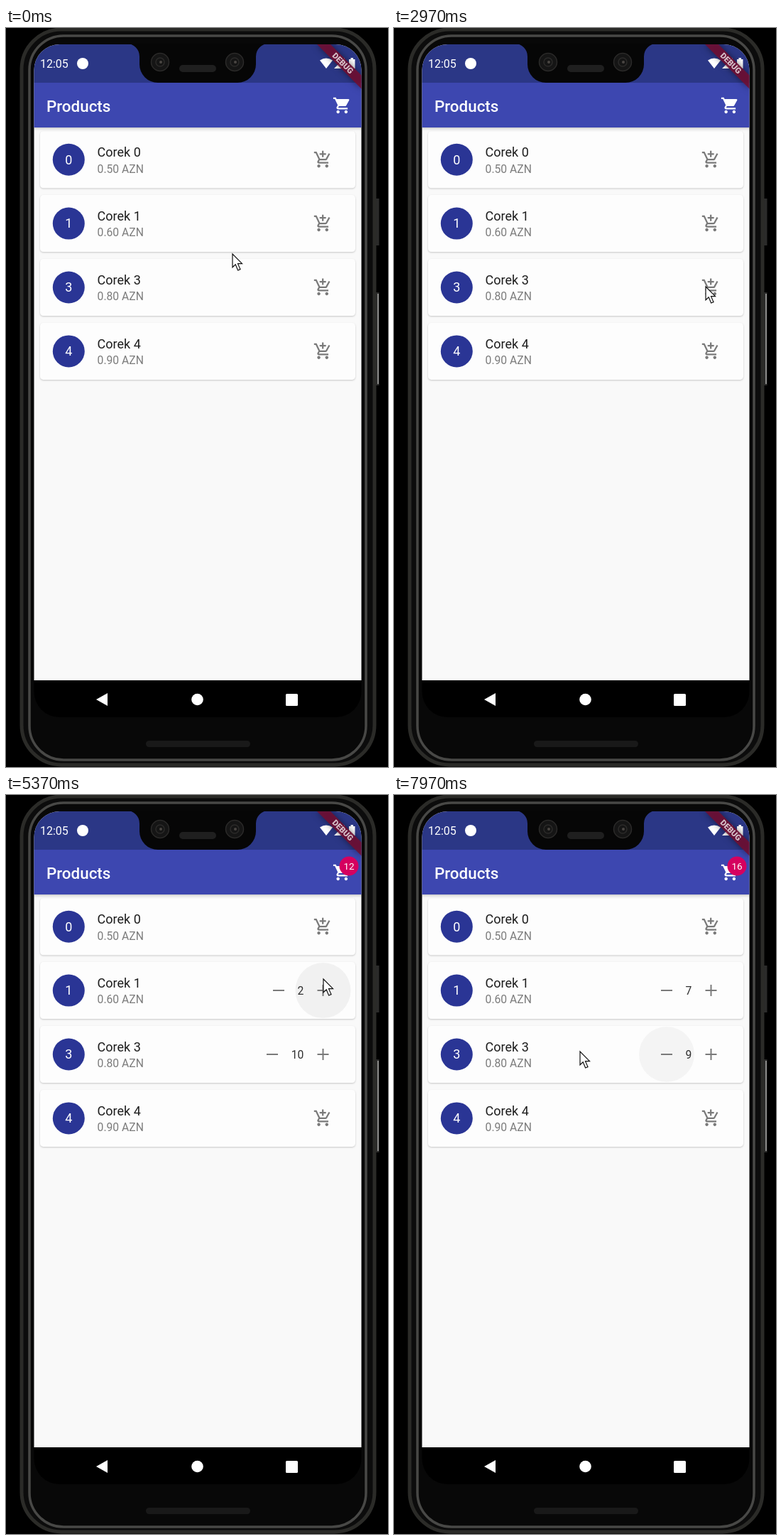
Animation of 538 by 1040 pixels, one loop 8 s. Source, as an HTML page:

```html
<!DOCTYPE html>
<html lang="en">
<head>
<meta charset="utf-8">
<title>Products</title>
<style>
  html, body { margin: 0; width: 100%; height: 100%; overflow: hidden; background: #000; }
  svg { display: block; width: 538px; height: 1040px; font-family: Roboto, Arial, sans-serif; }
  .mid { text-anchor: middle; }
  .card { fill: #fdfdfd; filter: drop-shadow(0 1px 1px #0003); }
  .bar { fill: #3d47b0; filter: drop-shadow(0 1px 2px #0004); }
  .banner { fill: #6f0f34; fill-opacity: .9; filter: drop-shadow(0 0 5px #0008); }
  .name { font-size: 18px; fill: #1d1d1d; }
  .price { font-size: 15.7px; fill: #7c7c7c; }
  .count { font-size: 15.7px; fill: #303030; }
</style>
</head>
<body>
<svg viewBox="0 0 538 1040">
  <defs>
    <clipPath id="screen"><rect x="39.5" y="23" width="461" height="947" rx="36"/></clipPath>
    <path id="wheels" d="M7 18c-1.1 0-1.99.9-1.99 2S5.9 22 7 22s2-.9 2-2-.9-2-2-2zm10 0c-1.1 0-1.99.9-1.99 2s.89 2 1.99 2 2-.9 2-2-.9-2-2-2z"/>
    <g id="cart">
      <use href="#wheels"/>
      <path d="M1 2v2h2l3.6 7.59-1.35 2.45c-.16.28-.25.61-.25.96 0 1.1.9 2 2 2h12v-2H7.42c-.14 0-.25-.11-.25-.25l.03-.12.9-1.63h7.45c.75 0 1.41-.41 1.75-1.03l3.58-6.49A1 1 0 0 0 20 4H5.21l-.94-2H1z"/>
    </g>
    <g id="addCart">
      <use href="#wheels"/>
      <path d="M11 9h2V6h3V4h-3V1h-2v3H8v2h3v3zm-3.83 5.75l.03-.12.9-1.63h7.45c.75 0 1.41-.41 1.75-1.03l3.86-7.01L19.42 4h-.01l-1.1 2-2.76 5H8.53l-.13-.27L6.16 6l-.95-2-.94-2H1v2h2l3.6 7.59-1.35 2.45c-.16.28-.25.61-.25.96 0 1.1.9 2 2 2h12v-2H7.42c-.13 0-.25-.11-.25-.25z"/>
    </g>
  </defs>

  <!-- phone body -->
  <rect width="538" height="1040"/>
  <path d="M523 240v66" stroke="#2b2b2a" stroke-width="5"/>
  <path d="M523 372v131" stroke="#2b2b2a" stroke-width="5"/>
  <path d="M524 374v127" stroke="#8a8a88" stroke-width="2"/>
  <rect x="22" y="2" width="497" height="1035" rx="56" fill="#0c0c0c" stroke="#2b2b28" stroke-width="5"/>
  <rect x="33" y="11" width="474" height="1019" rx="48" fill="#080808" stroke="#484846" stroke-width="3.5"/>
  <rect x="197" y="1003" width="147" height="9" rx="4.5" fill="#191919"/>

  <!-- screen -->
  <g clip-path="url(#screen)">
    <rect x="39" y="23" width="463" height="895" fill="#f9f9f9"/>
    <g id="cards"></g>
    <rect class="bar" x="39" y="77" width="463" height="63"/>
    <rect x="39" y="23" width="463" height="54" fill="#2b3786"/>
    <rect x="39" y="918" width="463" height="52"/>
    <path fill="#fff" d="M127 945l16-9v18z"/>
    <circle fill="#fff" cx="269.5" cy="945" r="8.3"/>
    <rect fill="#fff" x="394" y="937" width="17" height="17" rx="1.5"/>

    <g fill="#fff">
      <text x="48" y="56.3" font-size="16">12:05</text>
      <circle cx="108" cy="50" r="8"/>
      <path d="M442 45.5q9-6 18 0l-9 11.5z"/>
      <path d="M462 57l15-15v7l-4 4v4z"/>
      <path d="M483 44h2.5v-2h3.5v2h2.5v13H483z"/>
      <text x="57" y="117.5" font-size="22.4" font-weight="500">Products</text>
      <use href="#cart" transform="translate(459.8 95.5) scale(1.123)"/>
    </g>
    <path class="banner" d="M438 23h19l44 44v19z"/>
    <text class="mid" transform="translate(474.5 49.5) rotate(45)" y="4" font-size="11.4" font-weight="900" fill="#d6c0c8">DEBUG</text>
  </g>

  <!-- notch -->
  <path d="M170 22a18 18 0 0 1 18 18v11a26 26 0 0 0 26 26h112a26 26 0 0 0 26-26V40a18 18 0 0 1 18-18z" fill="#060606"/>
  <g fill="#151515" stroke="#2b2a29" stroke-width="1.5">
    <circle cx="217" cy="48" r="12.5"/><circle cx="322" cy="48" r="12.5"/>
    <circle cx="217" cy="48" r="6"/><circle cx="322" cy="48" r="6"/>
  </g>
  <circle cx="218" cy="48" r="2" fill="#4a4643"/><circle cx="323" cy="48" r="2" fill="#4a4643"/>
  <rect x="244" y="52" width="52" height="10" rx="5" fill="#1f1f1f"/>

  <g id="live"></g>
  <path id="cursor" d="M0 0v18.8l4.2-4 3.4 8.2 3.4-1.4-3.5-7.9h6z" fill="#fff" stroke="#111" stroke-width="1.2"/>
</svg>
<script>
const LOOP = 8000, FADE = 400;
const $ = id => document.getElementById(id);
const items = [[0, '0.50'], [1, '0.60'], [3, '0.80'], [4, '0.90']];
const rowY = row => 185.2 + row * 89.9;

$('cards').innerHTML = items.map(([id, price], row) => {
  const y = rowY(row);
  return `<rect class="card" x="48" y="${y - 40}" width="444" height="80" rx="4.5"/>
    <circle cx="88.3" cy="${y}" r="22.5" fill="#2a3595"/>
    <text class="mid" x="88.3" y="${y + 6.3}" font-size="18" fill="#fff">${id}</text>
    <text class="name" x="128.6" y="${y - 4}">Corek ${id}</text>
    <text class="price" x="128.6" y="${y + 18.3}">${price} AZN</text>`;
}).join('');

// Taps on the quantity buttons: time, row, change
const burst = (n, start, step, row) =>
  Array.from({ length: n }, (_, i) => ({ at: start + i * step, row, change: 1 }));
const taps = [
  ...burst(10, 3060, 140, 2),
  ...burst(7, 5060, 170, 1),
  { at: 7780, row: 2, change: -1 }
];

// Pointer stops: time, x, y
const stops = [
  [0, 319, 318], [860, 300, 336], [2200, 300, 336], [2800, 439, 364],
  [4400, 439, 364], [4850, 447, 259], [6130, 447, 259], [6500, 415, 324],
  [6900, 377, 361], [7800, 377, 361], [7970, 262, 361], [LOOP, 262, 361]
];

function pointer(t) {
  const i = stops.findIndex(s => s[0] > t);
  const [t0, x0, y0] = stops[i - 1], [t1, x1, y1] = stops[i];
  const u = (t - t0) / (t1 - t0), e = u * u * (3 - 2 * u);
  return [x0 + (x1 - x0) * e, y0 + (y1 - y0) * e];
}

function stepper(row, count, tap, t) {
  const y = rowY(row);
  if (!count) return `<use href="#addCart" fill="#7a7a7a" transform="translate(432.7 ${y - 13.5}) scale(1.123)"/>`;
  const wide = count > 9, minus = wide ? 375 : 384;
  const u = Math.min(1, (t - tap.at) / FADE);
  const x = tap.change > 0 ? 446.5 : minus;
  return `<circle cx="${x}" cy="${y}" r="${37.3 + 1.7 * Math.min(1, u * 3)}" fill-opacity="${0.07 * (1 - u)}"/>
    <path d="M${minus - 8} ${y}h16M438.5 ${y}h16M446.5 ${y - 8}v16" stroke="#7a7a7a" stroke-width="2"/>
    <text class="count mid" x="${wide ? 410.5 : 415}" y="${y + 5.6}">${count}</text>`;
}

function badge(total) {
  if (!total) return '';
  const [x, r] = total > 9 ? [483, 13.5] : [487, 9.8];
  return `<circle cx="${x}" cy="100" r="${r}" fill="#d5005f"/>
    <text class="mid" x="${x}" y="104.7" font-size="13.5" fill="#fff">${total}</text>`;
}

function draw(now) {
  const t = now % LOOP;
  const done = taps.filter(tap => tap.at <= t);
  const sum = list => list.reduce((n, tap) => n + tap.change, 0);
  $('live').innerHTML = items.map((_, row) => {
    const own = done.filter(tap => tap.row === row);
    return stepper(row, sum(own), own.at(-1), t);
  }).join('') + badge(sum(done));
  $('cursor').setAttribute('transform', `translate(${pointer(t)})`);
  requestAnimationFrame(draw);
}
draw(0);
</script>
</body>
</html>
```
